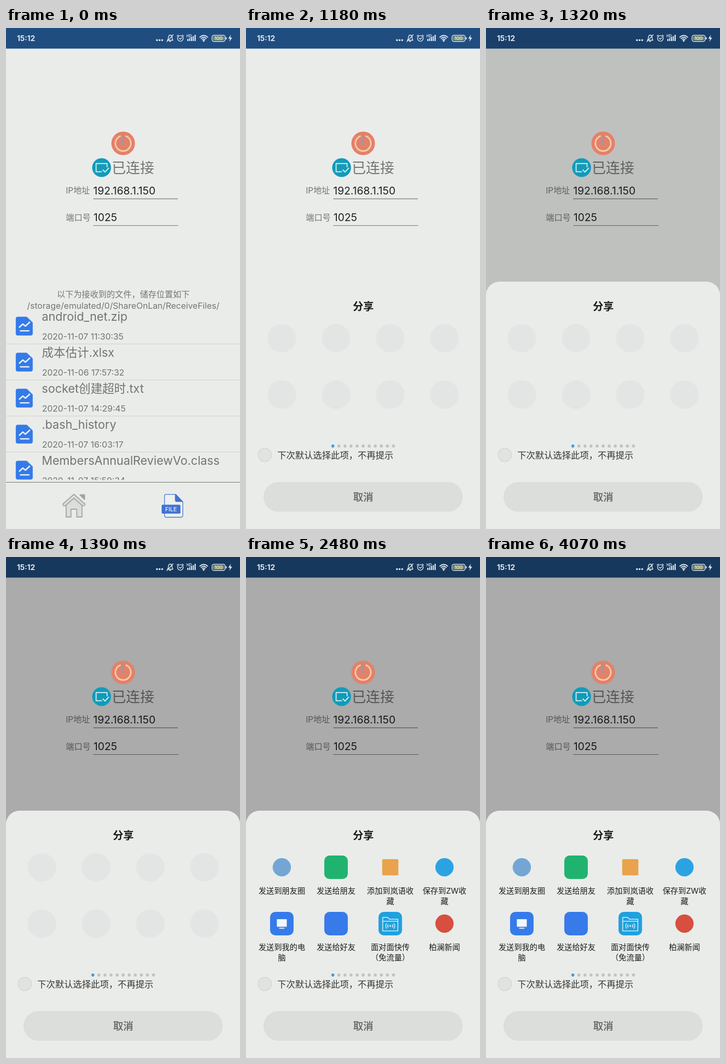
Write an HTML page that moves like this. It is 448 by 960 pixels and loops after 4.14 s.

```html
<!DOCTYPE html>
<html lang="zh-CN">
<head>
<meta charset="utf-8">
<title>Share sheet</title>
<style>
  html, body { margin: 0; width: 100%; height: 100%; overflow: hidden; background: #eaecea; }
  svg { display: block; width: 448px; height: 960px; }
  text { font-family: Inter, "Noto Sans CJK SC", "Noto Sans CJK", sans-serif; white-space: pre; }
  .line { fill: none; stroke-linecap: round; stroke-linejoin: round; }
  .mid { text-anchor: middle; }
  .note { font-size: 15.9px; fill: #747674; }
  .path { font-size: 16.4px; }
  .value { font-size: 20.2px; fill: #202220; }
  .name { font-size: 22.6px; fill: #727472; }
  .date { font-size: 16.4px; fill: #727472; }
  .app { font-size: 14.9px; fill: #1b1d1b; }
</style>
</head>
<body>
<svg viewBox="0 0 448 960">
  <defs>
    <clipPath id="listClip"><rect y="541" width="448" height="325"/></clipPath>
    <clipPath id="rowClip"><rect y="542" width="448" height="63"/></clipPath>
    <g id="doc">
      <path d="M4 0H21L32.500 11V32Q32.500 36 28.500 36H4Q0 36 0 32V4Q0 0 4 0Z" fill="#347be9"/>
      <path class="line" d="M7 20L13.500 14L18.500 18L26.500 10.500M9 27H25" stroke="#e9f0fa" stroke-width="2.600"/>
    </g>
  </defs>

  <rect width="448" height="960" fill="#eaecea"/>
  <rect width="448" height="39.500" fill="#204d80"/>

  <!-- connection panel -->
  <text x="202.500" y="278" font-size="27.100" fill="#747674">已连接</text>
  <text class="note" x="114.500" y="317">IP地址</text>
  <text class="value" x="167" y="318.500">192.168.1.150</text>
  <text class="note" x="114.500" y="368.700">端口号</text>
  <text class="value" x="167.500" y="370">1025</text>
  <path d="M167 327.300H329M167 378.500H330" stroke="#747674" stroke-width="1.200"/>
  <text class="note mid" x="224.500" y="516">以下为接收到的文件，储存位置如下</text>
  <text class="note path mid" x="224.500" y="537.500">/storage/emulated/0/ShareOnLan/ReceiveFiles/</text>

  <!-- received files -->
  <g id="list" clip-path="url(#listClip)"></g>
  <circle id="ripple" cx="320" cy="581" r="0" fill="#000" opacity=".025" clip-path="url(#rowClip)"/>
  <rect id="bar" x="444" y="665" width="4" height="192" fill="#a6a8a6"/>
  <circle id="touch" cx="307.300" cy="581.300" r="12.500" fill="#eceeed" fill-opacity=".8" stroke="#c6c9cd" stroke-width="2"/>

  <!-- bottom tabs -->
  <path d="M0 870.500H448" stroke="#727472"/>
  <g fill="#dcdedc" stroke="#a3a5a3" stroke-width="1.800" stroke-linejoin="round">
    <path d="M115 911V937H124.500V922H135.500V937H145.500V911L130 899Z"/>
    <path d="M130 893.500L151 912Q151 917 146 915L130 901L114 915Q109 917 109 912Z"/>
    <path d="M141.500 894.500H150.500V903.500Z" fill="#9d9f9d"/>
  </g>
  <path d="M306.500 893.700H325L338.500 908V934Q338.500 937.500 335 937.500H306.500Q303.500 937.500 303.500 934V897Q303.500 893.700 306.500 893.700Z" fill="#edf0ef" stroke="#4173d2" stroke-width="1.300"/>
  <path d="M323.500 893.500H325.500L339 907.500V908H327Q323.500 908 323.500 904.500Z" fill="#4173d2"/>
  <rect x="298" y="913.500" width="36" height="17" rx="2" fill="#4173d2"/>
  <text class="mid" x="316" y="926" font-size="11" font-weight="500" fill="#eef3fa">FILE</text>

  <rect id="dim" width="448" height="960" fill="#000" opacity="0"/>

  <!-- badges keep their colour above the dimming -->
  <circle cx="224.300" cy="221" r="22.600" fill="#e5806a"/>
  <path class="line" d="M218.500 207.300A14.800 14.800 0 1 0 230 207.300" stroke="#f2cda5" stroke-width="3"/>
  <path d="M224.300 205V224" stroke="#8c9fa6" stroke-width="3.400"/>
  <circle cx="183" cy="267.500" r="18" fill="#119bba"/>
  <path class="line" d="M183 275.500H172.500V259.800H193.500V266" stroke="#cfeaee" stroke-width="2"/>
  <path class="line" d="M185.500 272L189.500 276L196.500 268.500" stroke="#cfeaee" stroke-width="2"/>

  <!-- status bar -->
  <g fill="#e4eaf0">
    <text x="21" y="24.800" font-size="14.100" font-weight="700">15:12</text>
    <circle cx="289" cy="23.300" r="1.800"/><circle cx="294" cy="23.300" r="1.800"/><circle cx="299" cy="23.300" r="1.800"/>
    <text x="345.500" y="17.500" font-size="7" font-weight="600">HD</text>
    <path d="M347 25v-4h2.200v4zM350.500 25v-5.500h2.200v5.500zM354 25v-7.500h2.200v7.500zM357.500 25v-9.500h2.200v9.500zM361 25v-12h2.200v12z"/>
    <path d="M430.500 13L425.500 20.500H429L427.500 26.500L433 18.500H429.500Z"/>
    <circle cx="378.500" cy="24.500" r="1.800"/>
    <rect x="420.500" y="17.500" width="2" height="4.500" rx="1"/>
  </g>
  <g class="line" stroke="#e4eaf0" stroke-width="1.400">
    <path d="M309 23.500Q311 21.500 311 17.500Q311.500 13.500 314.500 13.500Q318 14 318 18Q318 21.500 319.500 23.500ZM312.500 25.500H315.500M308 26L320 13"/>
    <circle cx="333.800" cy="20" r="5.400"/>
    <path d="M331.500 19.500L333.500 21.500L336.500 19M327.500 15.500L330 13.500M337.500 13.500L340 15.500"/>
    <path d="M371 17.500Q378.500 11 386 17.500M373.500 20Q378.500 15.500 383.500 20M375.800 22.300Q378.500 20 381.200 22.300" stroke-width="1.700"/>
    <rect x="394.500" y="14" width="25" height="11.800" rx="3.500"/>
  </g>
  <rect x="396.500" y="16" width="21" height="7.800" rx="1.800" fill="#87976a"/>
  <text class="mid" x="407" y="23.300" font-size="9" font-weight="500" fill="#eef1e8">100</text>

  <!-- share sheet -->
  <g id="sheet">
    <path d="M0 960V512A26 26 0 0 1 26 486H422A26 26 0 0 1 448 512V960Z" fill="#eaece9"/>
    <text class="mid" x="224.500" y="541" font-size="20" font-weight="700" fill="#181a18">分享</text>
    <g id="blanks" fill="#e3e5e4"></g>
    <g id="apps"></g>
    <g id="dots"></g>
    <circle cx="36" cy="818" r="12.700" fill="#e1e3e1" stroke="#d1d3d1" stroke-width="1.200"/>
    <text x="60" y="824.700" font-size="17.100" fill="#343634">下次默认选择此项，不再提示</text>
    <rect x="33.500" y="870" width="381.500" height="57" rx="28.500" fill="#dcdedb"/>
    <text class="mid" x="224.500" y="906" font-size="19.300" fill="#606260" stroke="#606260" stroke-width=".4">取消</text>
  </g>
</svg>
<script>
const $ = id => document.getElementById(id);
const LOOP = 4140;

const files = [
  ["android_net.zip", "2020-11-07 11:30:35"],
  ["成本估计.xlsx", "2020-11-06 17:57:32"],
  ["socket创建超时.txt", "2020-11-07 14:29:45"],
  [".bash_history", "2020-11-07 16:03:17"],
  ["MembersAnnualReviewVo.class", "2020-11-07 15:59:34"]
];
$("list").innerHTML = files.map(([name, date], i) => `
  <g transform="translate(0 ${i * 69})">
    <use href="#doc" x="18.700" y="553.200"/>
    <text class="name" x="68.500" y="561">${name}</text>
    <text class="date" x="69" y="596.700">${date}</text>
    <path d="M0 605.500H448" stroke="#cfd1cf"/>
  </g>`).join("");

const disc = color => `<circle r="17.500" fill="${color}"/>`;
const tile = (color, size = 45, r = 10) =>
  `<rect x="${-size / 2}" y="${-size / 2}" width="${size}" height="${size}" rx="${r}" fill="${color}"/>`;
const monitor = `<path d="M-9.500 -8.500H9.500V6H-9.500ZM-5 8H5V9.700H-5Z" fill="#f2f6fc"/>`;
const folder = `<g class="line" stroke="#d6eef8" stroke-width="1.500">
  <path d="M-14.500 -12H-5L-2 -8.500H14.500V14H-14.500ZM-14.500 -4.500H14.500"/>
  <path d="M-4 2Q-6 4.500 -4 7M4 2Q6 4.500 4 7M-7 0Q-10.500 4.500 -7 9M7 0Q10.500 4.500 7 9"/>
  <circle cy="4.500" r="1"/></g>`;

const apps = [
  [disc("#73a6d4"), "发送到朋友圈"],
  [tile("#20b36f"), "发送给朋友"],
  [tile("#e9a34c", 31, 2), "添加到岚语收", "藏"],
  [disc("#2ba3e3"), "保存到ZW收", "藏"],
  [tile("#367be9") + monitor, "发送到我的电", "脑"],
  [tile("#367be9"), "发送给好友"],
  [tile("#1fa1df") + folder, "面对面快传", "（免流量）"],
  [disc("#d84f3f"), "柏澜新闻"]
];
const place = i => [68.600 + i % 4 * 103.800, i < 4 ? 594.500 : 702.500];

$("blanks").innerHTML = apps.map((_, i) => {
  const [x, y] = place(i);
  return `<circle cx="${x}" cy="${y}" r="27.300"/>`;
}).join("");

$("apps").innerHTML = apps.map(([icon, ...lines], i) => {
  const label = lines.map((s, n) => `<text class="app mid" y="${50 + n * 20}">${s}</text>`).join("");
  return `<g transform="translate(${place(i)})">${icon}${label}</g>`;
}).join("");

$("dots").innerHTML = Array.from({ length: 11 }, (_, i) =>
  `<circle cx="${166.300 + i * 11.600}" cy="801" r="2.900" fill="${i ? "#c0c3c2" : "#3a9fe3"}"/>`).join("");

const show = (id, on) => $(id).setAttribute("visibility", on ? "visible" : "hidden");

// times in ms
const PRESS = 770, RELEASE = 980, OPEN = 1180, LOADED = 1660;

function draw(t) {
  const tick = Math.floor((t - OPEN) / 70);
  show("touch", t >= PRESS && t < RELEASE);
  show("bar", t >= PRESS && t < OPEN);
  show("ripple", t >= PRESS && t < OPEN);
  const grow = Math.floor((t - PRESS) / 70) + 1;
  $("ripple").setAttribute("r", Math.max(0, Math.min(340, grow * 70)));

  $("dim").setAttribute("opacity", t < OPEN ? 0 : Math.min(3, tick) * .0917);
  show("sheet", t >= OPEN);
  show("blanks", t >= OPEN && t < LOADED);
  show("apps", t >= LOADED);
}

const start = performance.now();
function frame() {
  draw((performance.now() - start) % LOOP);
  requestAnimationFrame(frame);
}
frame();
</script>
</body>
</html>
```
